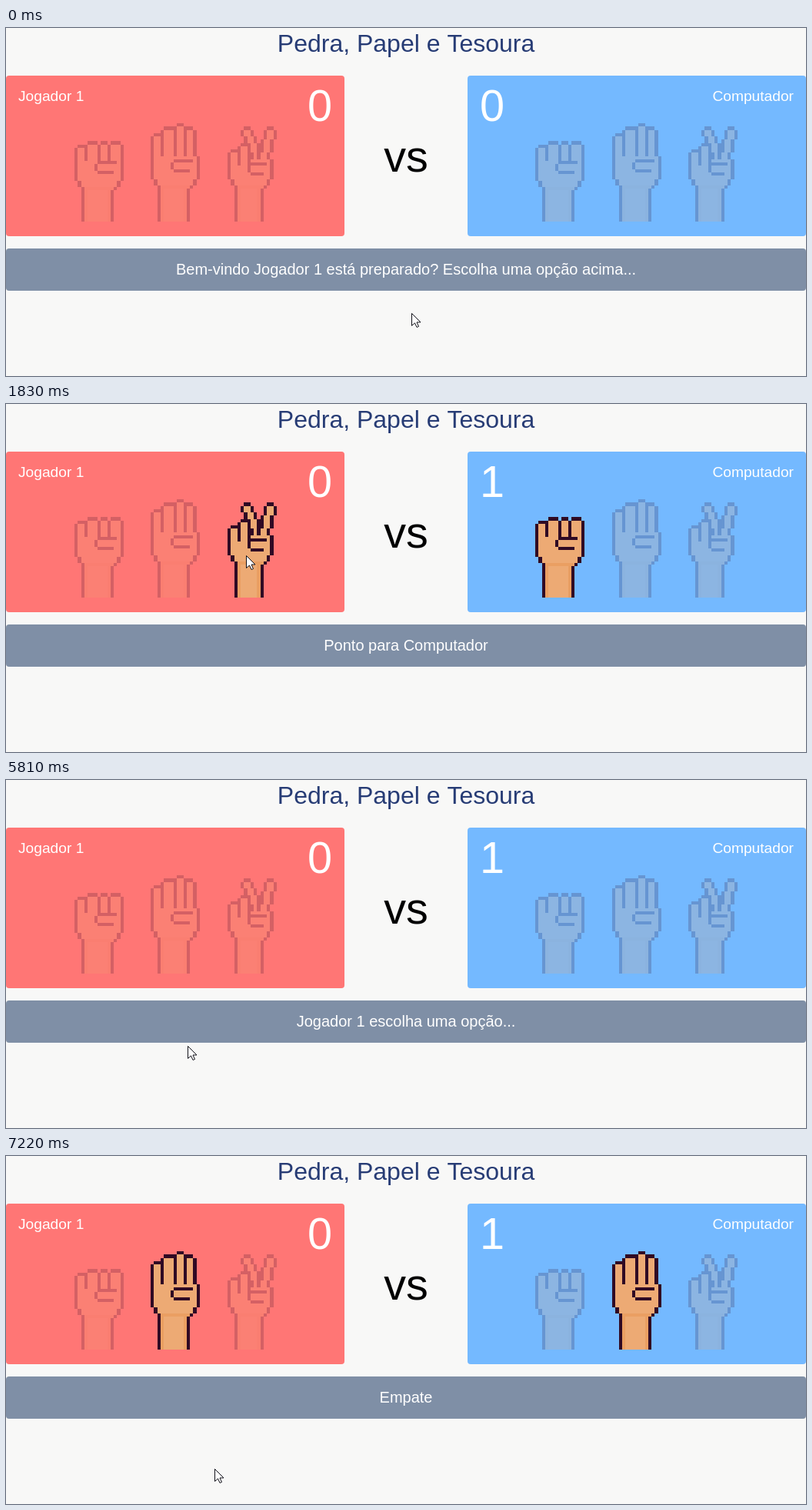
An HTML page with a canvas that plays this animation: 1040 by 453 pixels, repeating every 8 s.

```html
<!DOCTYPE html>
<html lang="pt">
<head>
<meta charset="utf-8">
<title>Pedra, Papel e Tesoura</title>
<style>
html, body { margin: 0; width: 100%; height: 100%; overflow: hidden; background: #f8f8f7; }
canvas { display: block; }
</style>
</head>
<body>
<canvas id="stage" width="1040" height="453"></canvas>
<script>
const ctx = document.getElementById('stage').getContext('2d');
const LOOP = 8000;
const FONT = '"Liberation Sans", Arial, sans-serif';
const INK = '#300a24', SKIN = '#edaa74', SHADE = '#ea9f62';
const HAND = { width: 64, height: 128, top: 124, pitch: 99.7 };
const CELL = HAND.width / 15;
const ROCK = 0, PAPER = 1, SCISSORS = 2, NONE = -1;

const clamp = (v, lo, hi) => Math.max(lo, Math.min(hi, v));

// A pixel-art hand on a grid of 15 by 30 cells, built from a palm and fingers.
function makeHand(build, shift = 0) {
  const sprite = document.createElement('canvas');
  sprite.width = HAND.width;
  sprite.height = HAND.height;
  const g = sprite.getContext('2d');
  g.translate(0, shift);

  function cells(x, y, w, h, color) {
    const left = Math.round(x * CELL), top = Math.round(y * CELL);
    g.fillStyle = color;
    g.fillRect(left, top, Math.round((x + w) * CELL) - left, Math.round((y + h) * CELL) - top);
  }

  // The palm narrows into the wrist below row 16.
  function palm(top, edge) {
    for (let row = top; row < 30; row++) {
      const left = clamp(Math.floor((row - 15) / 2), 0, 2);
      const right = edge - clamp(Math.floor((row - 15) * 0.6), 0, 3);
      cells(left, row, right - left + 1, 1, INK);
      cells(left + 1, row, right - left - 1, 1, row === 19 ? SHADE : SKIN);
      if (row > 19) {
        cells(left + 1, row, 1, 1, SHADE);
        cells(right - 1, row, 1, 1, SHADE);
      }
    }
  }

  function fingers(tops, widths, bottom) {
    let x = 1;
    tops.forEach((top, i) => {
      const w = widths[i];
      cells(x - 1, top + 1, w + 2, bottom - top, INK);
      cells(x, top, w, 1, INK);
      cells(x, top + 1, w, bottom - top, SKIN);
      x += w + 1;
    });
  }

  function slantedFinger(from, to, top, bottom) {
    cells(from, top, 2, 1, INK);
    for (let row = top + 1; row <= bottom; row++) {
      const x = Math.round(from + (to - from) * (row - top - 1) / (bottom - top - 1));
      cells(x - 1, row, 4, 1, INK);
      cells(x, row, 2, 1, SKIN);
    }
  }

  function thumb(row, edge) {
    cells(7, row, edge - 8, 1, INK);
    cells(6, row + 1, 1, 2, INK);
    cells(7, row + 3, edge - 9, 1, INK);
  }

  build({ palm, fingers, slantedFinger, thumb });
  return sprite;
}

const sprites = [
  makeHand(({ palm, fingers, thumb }) => {
    palm(11, 14);
    fingers([6, 5, 5, 5], [2, 3, 2, 3], 10);
    thumb(11, 14);
  }, 2),
  makeHand(({ palm, fingers, thumb }) => {
    palm(10, 14);
    fingers([3, 1, 0, 1], [2, 3, 2, 2], 9);
    thumb(11, 14);
  }),
  makeHand(({ palm, fingers, slantedFinger, thumb }) => {
    slantedFinger(5, 8, 1, 10);
    slantedFinger(12, 10, 1, 10);
    palm(11, 13);
    fingers([8, 6], [2, 2], 12);
    thumb(12, 13);
  })
];

const HOME = [527, 371];
const MOVES = [
  { from: 500, to: 1170, steps: 11, bend: [235, 355], end: [312, 197] },
  { from: 2620, to: 2820, steps: 4, end: [335, 389] },
  { from: 5550, to: 6300, steps: 12, bend: [140, 329], end: [226, 243] },
  { from: 6360, to: 6430, steps: 2, end: [225, 224] },
  { from: 7020, to: 7220, steps: 4, end: [271, 407] }
];

// The pointer advances in discrete steps, as in a screen recording.
function pointerAt(t) {
  let tip = HOME;
  for (const { from, to, steps, bend, end } of MOVES) {
    if (t < from) break;
    const start = tip;
    const step = Math.floor((t - from) / (to - from) * (steps - 1) + 0.1);
    const p = Math.min(1, (step + 1) / steps), q = 1 - p;
    tip = end.map((e, d) => {
      const mid = bend ? bend[d] : (start[d] + e) / 2;
      return Math.round(q * q * start[d] + 2 * p * q * mid + p * p * e);
    });
  }
  return tip;
}

const STATES = [
  { at: 0, message: 'Bem-vindo Jogador 1 está preparado? Escolha uma opção acima...' },
  { at: 1830, player: SCISSORS, computer: ROCK, message: 'Ponto para Computador' },
  { at: 5290, message: 'Jogador 1 escolha uma opção...' },
  { at: 6760, player: PAPER, computer: PAPER, message: 'Empate' }
];
const CLICKS = [{ from: 1700, to: 1830 }, { from: 6620, to: 6760 }];

function hovered([x, y]) {
  if (y < HAND.top || y > HAND.top + HAND.height) return NONE;
  return sprites.findIndex((_, i) => {
    const dx = x - 88.5 - i * HAND.pitch;
    return dx >= 0 && dx < HAND.width;
  });
}

function box(x, y, w, h, color) {
  ctx.fillStyle = color;
  ctx.beginPath();
  ctx.roundRect(x, y, w, h, 4);
  ctx.fill();
}

function text(value, x, y, size, color, align) {
  ctx.font = `${size}px ${FONT}`;
  ctx.fillStyle = color;
  ctx.textAlign = align;
  ctx.fillText(value, x, y);
}

function hands(left, active) {
  sprites.forEach((sprite, i) => {
    ctx.globalAlpha = i === active ? 1 : 0.2;
    ctx.drawImage(sprite, Math.round(left + i * HAND.pitch), HAND.top);
  });
  ctx.globalAlpha = 1;
}

function pointer([x, y]) {
  ctx.save();
  ctx.translate(x + 0.5, y + 0.5);
  const arrow = new Path2D('M0 0V16L4 12.5L6.5 18L9 17L6.5 11.5H11.5Z');
  ctx.fillStyle = '#fff';
  ctx.fill(arrow);
  ctx.strokeStyle = '#101018';
  ctx.lineWidth = 1;
  ctx.stroke(arrow);
  ctx.restore();
}

function clickMark([x, y]) {
  ctx.fillStyle = 'rgba(250, 218, 36, 0.82)';
  ctx.beginPath();
  ctx.arc(x, y, 12, 0, Math.PI * 2);
  ctx.fill();
}

function draw(t) {
  const { player, computer = NONE, message } = STATES.filter(s => t >= s.at).pop();
  const tip = pointerAt(t);
  const score = t < 1830 ? '0' : '1';

  ctx.fillStyle = '#f8f8f7';
  ctx.fillRect(0, 0, 1040, 453);
  text('Pedra, Papel e Tesoura', 520, 31, 32, '#273c75', 'center');

  box(0, 62, 440, 209, '#ff7675');
  box(600, 62, 440, 209, '#74b9ff');
  box(0, 287, 1040, 55, '#7f8fa6');

  text('Jogador 1', 16, 95, 19.2, '#fff', 'left');
  text('0', 424, 121, 57.6, '#fff', 'right');
  text(score, 616, 121, 57.6, '#fff', 'left');
  text('Computador', 1024, 95, 19.2, '#fff', 'right');
  text('vs', 520, 187, 57.6, '#000', 'center');
  text(message, 520, 321, 20, '#fff', 'center');

  hands(88.5, player ?? hovered(tip));
  hands(688, computer);
  if (CLICKS.some(c => t >= c.from && t < c.to)) clickMark(tip);
  pointer(tip);
}

const start = performance.now();
function tick() {
  draw((performance.now() - start) % LOOP);
  requestAnimationFrame(tick);
}
tick();
</script>
</body>
</html>
```
